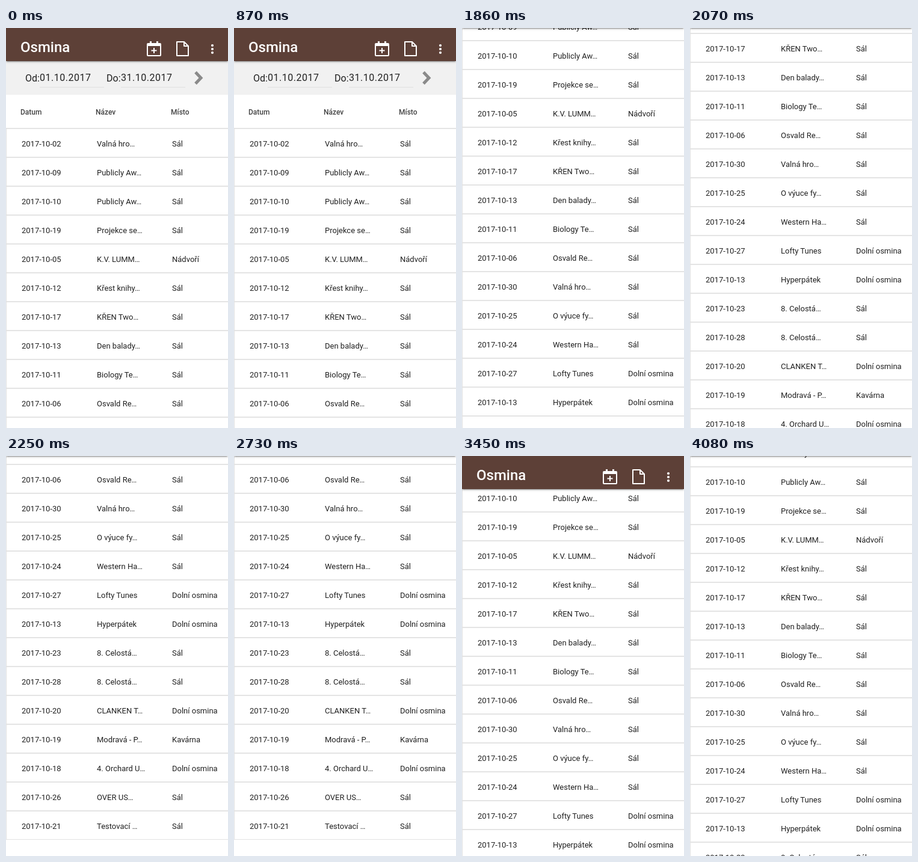
Recreate the animation shown at these times as an HTML page. Size 369x665 px, loop 4110 ms.

```html
<!DOCTYPE html>
<html lang="cs">
<head>
<meta charset="utf-8">
<title>Program</title>
<style>
html, body { margin: 0; width: 100%; height: 100%; overflow: hidden; background: #fff; }
body { position: relative; font: 13px Roboto, sans-serif; color: #212121; }
#page, header { position: absolute; top: 0; left: 0; width: 369px; }
header { height: 55px; background: #5d4037; box-shadow: 0 2px 2px rgba(0, 0, 0, .14), 0 3px 1px -2px rgba(0, 0, 0, .2), 0 1px 5px rgba(0, 0, 0, .12); }
#page { height: 1250px; }
b, span { position: absolute; white-space: nowrap; font-weight: 400; }
h1 { position: absolute; margin: 0; left: 24px; top: 16px; font: 500 24px/32px Roboto, sans-serif; color: #fff; }
svg { position: absolute; left: 0; top: 0; fill: none; stroke: #fff; }
#range { position: absolute; top: 55px; width: 369px; height: 56px; background: #f1f1f1; font-size: 16px; line-height: 20px; }
#range span { top: 19px; }
#range b { top: 18px; width: 107px; height: 25px; border-bottom: 1px solid #e0e0e0; letter-spacing: .5px; }
.head span { font-weight: 500; font-size: 12px; color: #424242; top: 132px; line-height: 16px; }
#rows { position: absolute; top: 166px; left: 0; width: 368px; height: 1056px; border-left: 1px solid #e2e2e2; border-bottom: 1px solid #e2e2e2; }
.row { position: relative; height: 46px; border-top: 2px solid #e4e4e4; }
.row span { top: 17px; line-height: 16px; }
</style>
</head>
<body>
<div id="page">
  <div id="range">
    <span style="left:32px">Od:</span><b style="left:56px">01.10.2017</b>
    <span style="left:167px">Do:</span><b style="left:191px">31.10.2017</b>
    <svg width="369" height="56"><path d="M315 18.5l9 9.5-9 9.5" stroke="#8a8a8a" stroke-width="5"/></svg>
  </div>
  <div class="head">
    <span style="left:24px">Datum</span><span style="left:149px">Název</span><span style="left:274px">Místo</span>
  </div>
  <div id="rows"></div>
</div>
<header>
  <h1>Osmina</h1>
  <svg width="369" height="55" stroke-width="2">
    <rect x="235" y="26" width="22" height="20" rx="1"/>
    <path d="M235 28.5h22" stroke-width="3"/>
    <path d="M240.5 22v5M251.5 22v5" stroke-width="3"/>
    <path d="M246 33v9M241.5 37.5h9"/>
    <path d="M284 23h12l7 7v16h-19zM296 23v7h7" stroke-linejoin="round"/>
    <g fill="#fff" stroke="none"><circle cx="343" cy="29" r="2.1"/><circle cx="343" cy="35" r="2.1"/><circle cx="343" cy="41" r="2.1"/></g>
  </svg>
</header>
<script>
const LOOP = 4110, STEP = 30, BAR = 55, END = 585, TURN = 165;
const hall = 'Sál', cellar = 'Dolní osmina';
const events = [
  ['02', 'Valná hro…'], ['09', 'Publicly Aw…'], ['10', 'Publicly Aw…'], ['19', 'Projekce se…'],
  ['05', 'K.V. LUMM…', 'Nádvoří'], ['12', 'Křest knihy…'], ['17', 'KŘEN Two…'], ['13', 'Den balady…'],
  ['11', 'Biology Te…'], ['06', 'Osvald Re…'], ['30', 'Valná hro…'], ['25', 'O výuce fy…'],
  ['24', 'Western Ha…'], ['27', 'Lofty Tunes', cellar], ['13', 'Hyperpátek', cellar],
  ['23', '8. Celostá…'], ['28', '8. Celostá…'], ['20', 'CLANKEN T…', cellar],
  ['19', 'Modravá - P…', 'Kavárna'], ['18', '4. Orchard U…', cellar], ['26', 'OVER US…'], ['21', 'Testovací …']
];
const cell = (x, text) => `<span style="left:${x}px">${text}</span>`;
document.getElementById('rows').innerHTML = events.map(([day, name, place = hall]) =>
  `<div class="row">${cell(25, '2017-10-' + day)}${cell(150, name)}${cell(275, place)}</div>`).join('');

// Scroll positions over time: [ms, px]
const keys = [
  [0, 0], [1200, 0], [1380, 40], [1650, 130], [1900, 270], [2070, 446], [2160, 563], [2220, END],
  [3060, END], [3240, 489], [3450, 218], [3620, TURN], [3800, TURN], [4050, 245], [LOOP, 245]
];
const rate = i => (keys[i + 1][1] - keys[i][1]) / (keys[i + 1][0] - keys[i][0]);
// Harmonic mean of neighbouring rates keeps the curve monotone
function slope(i) {
  if (i === 0 || i === keys.length - 1) return 0;
  const a = rate(i - 1), b = rate(i);
  return a * b > 0 ? 2 * a * b / (a + b) : 0;
}
function scrollAt(t) {
  const i = keys.findIndex(k => k[0] > t) - 1;
  const [t0, y0] = keys[i], [t1, y1] = keys[i + 1];
  const d = t1 - t0, u = (t - t0) / d, v = 1 - u;
  return Math.round(y0 * v * v * (1 + 2 * u) + y1 * u * u * (3 - 2 * u)
    + d * u * v * (slope(i) * v - slope(i + 1) * u));
}
// The bar slides away while scrolling down and returns while scrolling up
function hiddenAt(t, y) {
  if (t < 2600) return Math.min(BAR, y);
  if (t < 3700) return Math.max(0, y - END + BAR);
  return Math.min(BAR, y - TURN);
}
const page = document.getElementById('page'), bar = document.querySelector('header');
const shift = (el, y) => { el.style.top = `${-y}px`; };
const start = performance.now();
function draw() {
  const t = Math.floor((performance.now() - start) % LOOP / STEP) * STEP;
  const y = scrollAt(t);
  shift(page, y);
  shift(bar, hiddenAt(t, y));
  requestAnimationFrame(draw);
}
draw();
</script>
</body>
</html>
```
